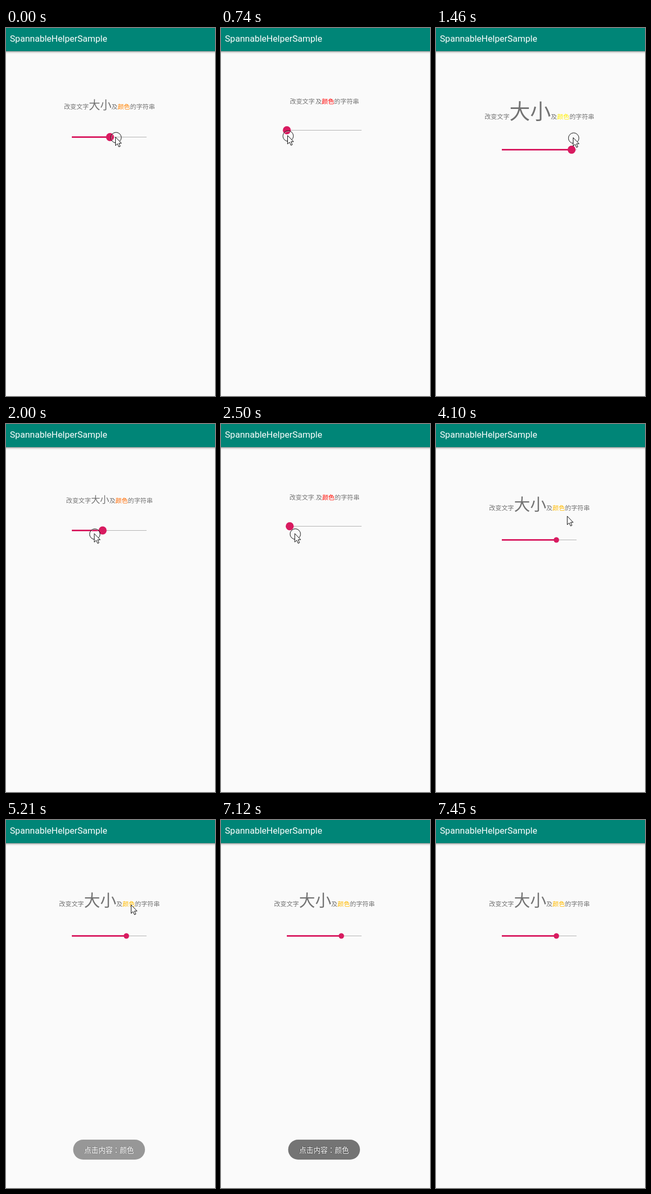
These frames come from a looping animation (400x700 px, 8490 ms). An HTML page:

```html
<!DOCTYPE html>
<html lang="zh-CN">
<head>
<meta charset="utf-8">
<style>
html, body { margin: 0; width: 100%; height: 100%; overflow: hidden; background: #fafafa; }
svg { display: block; width: 400px; height: 700px; }
text { font-family: "Noto Sans CJK SC", "Noto Sans CJK", sans-serif; }
.title { font: 17px Roboto, sans-serif; }
.toast { font-size: 13.6px; text-shadow: 0 0 2px rgba(0,0,0,.6); }
.colon { font-family: "Noto Sans CJK TC", sans-serif; }
#tint { font-weight: 500; }
</style>
</head>
<body>
<svg viewBox="0 0 400 700">
  <defs>
    <linearGradient id="shade" x2="0" y2="1">
      <stop stop-color="#000" stop-opacity=".42"/>
      <stop offset=".4" stop-color="#000" stop-opacity=".14"/>
      <stop offset="1" stop-color="#000" stop-opacity="0"/>
    </linearGradient>
  </defs>
  <rect width="400" height="700" fill="#fafafa"/>
  <rect y="44" width="400" height="5" fill="url(#shade)"/>
  <rect width="400" height="44" fill="#008577"/>
  <text class="title" x="7.5" y="26" fill="#fff">SpannableHelperSample</text>

  <g id="line" fill="#737373" font-size="11.9">
    <text>改变文字</text>
    <text id="big">大小</text>
    <text>及</text>
    <text id="tint">颜色</text>
    <text>的字符串</text>
  </g>

  <g id="bar">
    <path d="M126 0H269" stroke="#b0b0b0" stroke-width="1.2"/>
    <path id="fill" stroke="#d81b60" stroke-width="3"/>
    <circle id="thumb" fill="#d81b60"/>
  </g>

  <g id="toast">
    <rect x="128.5" y="608" width="137.5" height="38" rx="19" fill="#737373"/>
    <text class="toast" x="197.3" y="633" text-anchor="middle" fill="#fff">点击内容<tspan class="colon" lang="zh-TW">：</tspan>颜色</text>
  </g>

  <g id="mouse">
    <g id="ring" fill="none">
      <circle r="9.2" stroke="#fff" stroke-opacity=".8"/>
      <circle r="10" stroke="#000"/>
    </g>
    <path d="M-1 -1V15.2L2.7 11.7L5.4 17.6L8 16.5L5.4 10.7H10.3Z" fill="#fff" stroke="#000" stroke-linejoin="round"/>
  </g>
</svg>
<script>
const LOOP = 8490, SMALL = 11.9, BIG = 42.4, MID = 198;
const LEFT = 126, SPAN = 143, LAG = 50, RELEASE = 3420;
const $ = id => document.getElementById(id);
const parts = [...$('line').children];
const clamp = v => Math.max(0, Math.min(1, v));
const within = (t, a, b) => clamp((t - a) / (b - a));
const set = (el, attrs) => Object.entries(attrs).forEach(([k, v]) => el.setAttribute(k, v));

// Each move eases the mouse to a new place
const home = { x: 189, y: 208.5 };
const moves = [
  { from: -200, to: 280, x: 246, y: 208.5 },
  { from: 310, to: 690, x: 128.5, y: 205.5 },
  { from: 820, to: 1410, x: 263.5, y: 209.5 },
  { from: 1660, to: 2200, x: 128.5, y: 209.5 },
  { from: 2370, to: 2950, x: 234, y: 208.5 },
  { from: RELEASE, to: 3750, x: 277, y: 198 },
  { from: 3750, to: 4250, x: 245.5, y: 170.5 },
  { from: 4400, to: 4570, x: 240.5, y: 162.5 }
];

function mouseAt(t) {
  let { x, y } = home;
  for (const m of moves) {
    const u = within(t, m.from, m.to), e = u * u * (3 - 2 * u);
    x += (m.x - x) * e;
    y += (m.y - y) * e;
  }
  return { x, y };
}

function drawLine(p) {
  const size = Math.max(.75, BIG * p), grow = Math.max(0, size - SMALL);
  const y = Math.round(144 + 1.035 * grow);
  let x = MID - (11 * SMALL + 2 * size) / 2;
  for (const el of parts) {
    const em = el.id === 'big' ? size : SMALL;
    set(el, { x, y, 'font-size': em });
    x += el.textContent.length * em;
  }
  set($('tint'), { fill: `rgb(255,${Math.round(255 * p)},0)` });
  return Math.round(194.4 + 1.33 * grow) + .5;
}

function draw(t) {
  // The thumb trails the mouse while it is held down
  const held = mouseAt(Math.min(t - LAG, RELEASE)).x;
  const p = clamp((held - 128.5) * .989 / SPAN), x = LEFT + SPAN * p;
  set($('bar'), { transform: `translate(0 ${drawLine(p)})` });
  set($('fill'), { d: `M${LEFT} 0H${x}` });
  set($('thumb'), { cx: x, r: 7.7 - 2.5 * within(t, RELEASE - 20, RELEASE + 130) });

  const mouse = mouseAt(t);
  const pressed = t < RELEASE || (t >= 4850 && t < 4910);
  set($('mouse'), {
    transform: `translate(${mouse.x} ${mouse.y})`,
    display: t < 5800 ? 'inline' : 'none'
  });
  set($('ring'), { display: pressed ? 'inline' : 'none' });

  const enter = t < 5060 ? 0 : 1 - (1 - within(t, 5030, 5410)) ** 2;
  const leave = within(t, 7090, 7450) ** 2;
  set($('toast'), { opacity: enter * (1 - leave) });
}

const start = performance.now();
function tick(now) {
  draw(Math.max(0, now - start) % LOOP);
  requestAnimationFrame(tick);
}
draw(0);
requestAnimationFrame(tick);
</script>
</body>
</html>
```
